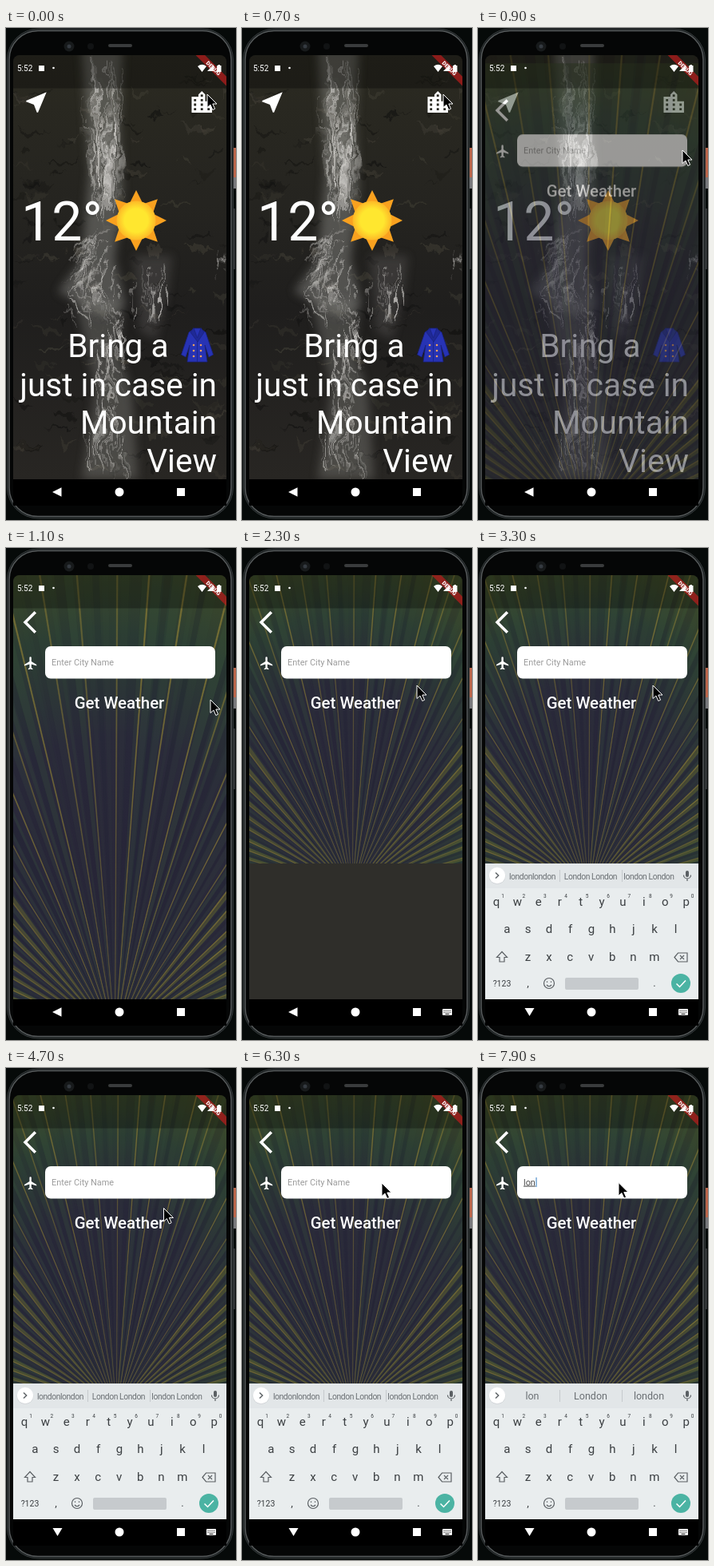
Write an HTML page that moves like this. It is 288 px wide and 616 px high and loops after 8 s.

```html
<!DOCTYPE html>
<html lang="en">
<head>
<meta charset="utf-8">
<title>Weather app</title>
<style>
  html, body { margin: 0; width: 100%; height: 100%; overflow: hidden; background: #060a09; }
  svg { display: block; width: 100%; height: 100%; font-family: Roboto, sans-serif; }
  .mid { text-anchor: middle; }
  .end { text-anchor: end; }
</style>
</head>
<body>
<svg viewBox="0 0 288 616" fill="#fff">
  <defs>
    <clipPath id="screen"><rect x="9" y="34" width="267" height="550" rx="8"/></clipPath>
    <filter id="soft" x="-20%" y="-20%" width="140%" height="140%"><feGaussianBlur stdDeviation="6"/></filter>
    <filter id="wisp" color-interpolation-filters="sRGB">
      <feTurbulence type="fractalNoise" baseFrequency=".07 .035" numOctaves="3" seed="4"/>
      <feDisplacementMap in="SourceGraphic" scale="24" xChannelSelector="R" yChannelSelector="G"/>
      <feGaussianBlur stdDeviation=".7"/>
    </filter>
    <linearGradient id="rock" x2="0" y2="1">
      <stop offset="0" stop-color="#2b2a21"/><stop offset=".35" stop-color="#252420"/>
      <stop offset=".6" stop-color="#1f1e1d"/><stop offset="1" stop-color="#282623"/>
    </linearGradient>
    <radialGradient id="disc">
      <stop offset=".6" stop-color="#ffe72f"/><stop offset="1" stop-color="#fdb827"/>
    </radialGradient>
    <radialGradient id="leaf" gradientUnits="userSpaceOnUse" cx="-16" cy="370" r="400">
      <stop offset="0" stop-color="#292739"/><stop offset=".42" stop-color="#2a2a3a"/>
      <stop offset=".75" stop-color="#2c3d33"/><stop offset="1" stop-color="#3f4a27"/>
    </radialGradient>
    <radialGradient id="gold" gradientUnits="userSpaceOnUse" cx="-6" cy="580" r="620">
      <stop offset="0" stop-color="#a89a3e"/><stop offset=".3" stop-color="#85783a"/>
      <stop offset=".65" stop-color="#6b6038"/><stop offset="1" stop-color="#877a35"/>
    </radialGradient>
  </defs>

  <!-- phone body -->
  <path fill="#b9654a" d="M284 150h4v37h-4z"/>
  <path fill="#77777a" d="M284 187h4v14h-4z"/>
  <path fill="#303334" d="M284 226h3v76h-3z"/>
  <rect x="1.500" y="1" width="283" height="613" rx="39" fill="#1a1e1f" stroke="#34393a"/>
  <rect x="4" y="3.500" width="278" height="608" rx="36" fill="#050606" stroke="#565a5b" stroke-width="1.500"/>
  <circle cx="79" cy="23" r="6.500" fill="#171a1b"/><circle cx="79" cy="23" r="2.500" fill="#343a40"/>
  <circle cx="106" cy="23" r="4" fill="#111314"/>
  <rect x="128" y="20" width="30" height="4" rx="2" fill="#393b3c"/>

  <g clip-path="url(#screen)">
    <g id="weather">
      <rect x="9" y="34" width="267" height="531" fill="url(#rock)"/>
      <g id="rocks" filter="url(#wisp)"/>
      <g filter="url(#soft)" fill="#9a9894">
        <path opacity=".42" d="M95 25H146L142 120 146 200 136 290 150 345 120 360 65 330 95 290 104 180Z"/>
        <path opacity=".2" d="M160 285H208L203 330 188 390 168 380Z"/>
        <path opacity=".32" d="M85 335 148 345 140 400 158 460 165 565H95L112 450Z"/>
      </g>
      <g id="water" filter="url(#wisp)" stroke="#e2e0dc"/>
      <path d="M21 3L3 10.530v.98l6.840 2.650L12.480 21h.98L21 3z" transform="translate(21 76) scale(1.417)"/>
      <path d="M15 11V5l-3-3-3 3v2H3v14h18V11h-6zm-8 8H5v-2h2v2zm0-4H5v-2h2v2zm0-4H5V9h2v2zm6 8h-2v-2h2v2zm0-4h-2v-2h2v2zm0-4h-2V9h2v2zm0-4h-2V5h2v2zm6 12h-2v-2h2v2zm0-4h-2v-2h2v2z" transform="translate(228.200 76.200) scale(1.417)"/>
      <text x="19" y="266" font-size="68">12°</text>
      <g transform="translate(163 241)">
        <g id="sun" fill="#f9a11f"/>
        <circle r="24.500" fill="url(#disc)"/>
      </g>
      <g class="end" font-size="40.600">
        <text x="203.500" y="412">Bring a</text><text x="264" y="460.500">just in case in</text>
        <text x="264" y="508">Mountain</text><text x="264" y="556">View</text>
      </g>
      <g stroke="#1a2380" stroke-width=".8">
        <path fill="#2733b4" d="M236 376 229 381 219.500 409 225 412 230 397 227 418H252L249 397 254 412 259.500 409 250 381 243 376Z"/>
        <path fill="#1f2996" d="M235 375.500 239.500 388 244 375.500 248 381 240 393 231 381Z"/>
        <path fill="none" d="M239.500 392V418"/>
      </g>
      <g id="buttons" fill="#f0a060"/>
    </g>

    <g id="search">
      <g id="palm">
        <rect x="-220" width="440" height="540" fill="url(#leaf)"/>
        <g id="rays"/>
      </g>
      <rect id="gap" x="9" y="395" width="267" height="171" fill="#2f2e2a"/>
      <path d="M11.670 3.870L9.900 2.100 0 12l9.900 9.900 1.770-1.770L3.540 12z" transform="translate(21.500 76) scale(1.417)"/>
      <path d="M21 16v-2l-8-5V3.500c0-.83-.67-1.500-1.500-1.500S10 2.670 10 3.500V9l-8 5v2l8-2.500V19l-2 1.500V22l3.500-1 3.500 1v-1.500L13 19v-5.500l8 2.500z" transform="translate(21.400 134.700) scale(.8)"/>
      <rect x="49" y="123" width="213" height="40.500" rx="7"/>
      <text id="hint" x="57" y="146.500" font-size="10.900" fill="#9c9c9c">Enter City Name</text>
      <text id="typed" x="57" y="146.500" font-size="10.900" fill="#4a4a4a" text-decoration="underline"></text>
      <rect id="caret" y="137" width="1.300" height="12" fill="#5f9ad0"/>
      <text class="mid" x="142" y="201" font-size="20.400" font-weight="500">Get Weather</text>
    </g>

    <path opacity=".3" fill="#000" d="M9 34h267v41.500H9z"/>
    <g transform="translate(276 34) rotate(45)">
      <rect x="-28" y="19" width="56" height="8.200" fill="#b71c1c" opacity=".72"/>
      <text class="mid" y="25.600" font-size="6.900" font-weight="900">DEBUG</text>
    </g>
    <text x="14" y="54" font-size="10">5:52</text>
    <rect x="41" y="47" width="7" height="7"/>
    <circle cx="59.500" cy="50" r="1.300"/>
    <path d="M240 48Q245.500 43.500 251 48L245.500 55ZM252 54 260 46V54ZM264 47h1.500v-1h2.500v1h1.500v8h-5.500z"/>

    <g id="keyboard" fill="#3b3f42">
      <rect x="9" y="395" width="267" height="171" fill="#e9edee"/>
      <rect x="9" y="395" width="267" height="31" fill="#e2e6e8"/>
      <circle cx="24" cy="410.500" r="10.500" fill="#cfd3d6"/><circle cx="24" cy="410" r="10.200" fill="#fff"/>
      <path id="chevron" d="M-2-3.500 1.700 0-2 3.500" fill="none" stroke="#5a5f63" stroke-width="1.400"/>
      <g id="words" class="mid" fill="#6a6f73">
        <path d="M102.500 403V418M180.500 403V418" stroke="#c6cacd"/>
        <text x="68" y="415"></text><text x="141" y="415"></text><text x="214" y="415"></text>
      </g>
      <rect x="260" y="404" width="4" height="8" rx="2" fill="#5a5f63"/>
      <path d="M257.500 409.500a4.500 4.500 0 0 0 9 0M262 414v3" fill="none" stroke="#5a5f63" stroke-width="1.200"/>
      <g id="keys" class="mid"/>
      <g fill="none" stroke="#5a5f63" stroke-width="1.200">
        <path d="M30 505.500 36.500 512.500H33V518H27V512.500H23.500Z"/>
        <path d="M246 512.500 250.500 507H262V518H250.500ZM253 510l5 5m0-5-5 5"/>
        <circle cx="89" cy="545" r="6.500"/><path d="M86 547q3 3.500 6 0M86.500 542.500v1.500M91.500 542.500v1.500"/>
      </g>
      <rect x="109" y="538" width="92" height="15" rx="2" fill="#c6cacd"/>
      <circle cx="254" cy="545" r="12" fill="#4bb3a3"/>
      <path d="M248.500 545.500 252.500 549.500 260 541.500" fill="none" stroke="#fff" stroke-width="1.500"/>
    </g>
  </g>

  <!-- navigation bar -->
  <rect x="9" y="565" width="267" height="33" fill="#000"/>
  <path id="back"/>
  <circle cx="142" cy="581" r="5.500"/>
  <path d="M214 576h10v10h-10z"/>
  <g id="imeIcon">
    <rect x="251" y="577" width="12" height="8" rx="1"/>
    <path d="M252.500 579.500h9M252.500 581.500h9" stroke="#000" stroke-width=".9" stroke-dasharray="1 1"/>
    <path d="M254.500 583.500h5" stroke="#000" stroke-width=".9"/>
  </g>
  <path id="mouse" fill="#000" stroke="#fff" d="M0 0V16.500L3.900 13 6.800 19.500 9.600 18.200 6.800 12H12Z"/>
</svg>

<script>
const $ = id => document.getElementById(id);
const fill = (id, parts) => { $(id).innerHTML = parts.join(''); };
const show = (id, on) => { $(id).style.display = on ? '' : 'none'; };
const range = (n, fn) => Array.from({ length: n }, (_, i) => fn(i));
const clamp = v => Math.max(0, Math.min(1, v));
let seed = 7;
const rnd = (a = 0, b = 1) => a + (b - a) * ((seed = seed * 16807 % 2147483647) / 2147483647);

// Waterfall: dark ledges, then streaks in bands [x, width, y, height, drift, count]
fill('rocks', range(150, () => {
  const x = rnd(0, 270), y = rnd(60, 560), w = rnd(10, 45);
  return `<path d="M${x} ${y}l${w} ${rnd(-7, 7)} ${-w / 2} ${rnd(3, 9)}z" fill="${rnd() < .6 ? '#0d0d0c' : '#47443a'}" opacity="${rnd(.2, .5)}"/>`;
}));
const bands = [[95, 50, 30, 190, 3, 50], [114, 32, 80, 170, -5, 40], [92, 45, 250, 85, -28, 45],
  [62, 85, 320, 55, 14, 40], [158, 52, 285, 90, -3, 25], [112, 36, 365, 110, 8, 40],
  [92, 68, 465, 100, 0, 45], [266, 8, 275, 45, 2, 6]];
fill('water', bands.flatMap(([x, w, y, h, drift, n]) => range(n, () => {
  const len = h * rnd(.12, .45);
  return `<path d="M${x + w * (rnd() + rnd()) / 2} ${y + rnd(0, h - len)}l${drift * rnd(0, 1.2)} ${len}" stroke-width="${rnd(.7, 2.4)}" opacity="${rnd(.1, .45)}"/>`;
})));

// Sun points and coat buttons
fill('sun', range(8, i => `<path d="M-8.500-21 0-38 8.500-21z" transform="rotate(${i * 45})"/>`));
fill('buttons', range(6, i => `<circle cx="${i % 2 ? 244 : 235}" cy="${397 + 7 * (i >> 1)}" r="1.300"/>`));

// Palm leaf: folds fanning out from one point
const fan = (angle, tip, style) => `<path d="M0 0L${-tip}-800H${tip}z" transform="translate(-6 580) rotate(${angle})" ${style}/>`;
fill('rays', range(39, i => {
  const a = -87.4 + i * 4.6 + rnd(-.5, .5), outer = Math.abs(a) > 35;
  const folds = range(3, k => fan(a + 1.15 * (k + 1), rnd(4, 11), `fill="${k % 2 ? '#1a1c2b' : '#3a5a3c'}" opacity="${rnd(.06, .24)}"`));
  const glow = outer ? fan(a + .7, 10, 'fill="#858327" opacity=".3"') : '';
  return folds.join('') + glow + fan(a, outer ? 2.2 : 1.2, `fill="url(#gold)" stroke="url(#gold)" stroke-width=".5" opacity="${rnd(.55, .85)}"`);
}));

// Keyboard letters
const label = (x, y, size, s) => `<text x="${x}" y="${y}" font-size="${size}">${s}</text>`;
const row = (s, x, y) => [...s].map((c, i) => label(x + 26.4 * i, y, 15, c));
fill('keys', [
  ...row('qwertyuiop', 23, 448), ...row('asdfghjkl', 36.3, 482), ...row('zxcvbnm', 62.5, 516.5),
  ...range(10, i => label(31 + 26.4 * i, 437.5, 6.5, (i + 1) % 10)),
  label(30, 549, 10.5, '?123'), label(62.5, 549, 13, ','), label(221, 549, 13, '.')
]);

// y of a unit cubic Bezier at a given x
function bezier(x1, y1, x2, y2, x) {
  const at = (a, b, u) => 3 * a * u * (1 - u) ** 2 + 3 * b * u * u * (1 - u) + u ** 3;
  let lo = 0, hi = 1;
  for (let i = 0; i < 24; i++) {
    const m = (lo + hi) / 2;
    at(x1, x2, m) < x ? lo = m : hi = m;
  }
  return at(y1, y2, lo);
}

// Pointer stops: [time, x, y]
const pointer = [[0, 252, 83], [700, 252, 83], [900, 256, 153], [1100, 256, 190], [1500, 219, 172],
  [4200, 219, 172], [4500, 221, 202], [4900, 174, 149], [6200, 174, 149], [6300, 175, 144], [6400, 176, 143.5], [8000, 176, 143.5]];
function pointerAt(t) {
  const i = pointer.findIndex(p => p[0] > t), [t0, x0, y0] = pointer[i - 1], [t1, x1, y1] = pointer[i];
  const k = (t - t0) / (t1 - t0);
  return [x0 + (x1 - x0) * k, y0 + (y1 - y0) * k];
}

function draw(t) {
  // page change: fade in while sliding up
  const p = clamp((t - 695) / 300);
  $('search').style.opacity = bezier(.42, 0, 1, 1, p);
  $('search').setAttribute('transform', `translate(0 ${145 * (1 - bezier(.4, 0, .2, 1, p))})`);
  show('search', p > 0);
  show('weather', p < 1);

  // the page shrinks at once, then the keyboard slides in
  const small = t >= 2200;
  $('palm').setAttribute('transform', `translate(142.5 34) scale(${small ? .68 : 1})`);
  show('gap', small);
  show('imeIcon', small);
  $('keyboard').setAttribute('transform', `translate(0 ${171 * (1 - clamp((t - 2300) / 400)) ** 2})`);
  $('back').setAttribute('d', t >= 2400 ? 'M58.500 576h12l-6 10z' : 'M58 581l11.500-5.800v11.600z');

  // typing
  const text = 'lon'.slice(0, t < 7500 ? 0 : t < 7700 ? 1 : t < 7900 ? 2 : 3);
  const cleared = t >= 6700 && !text;
  $('typed').textContent = text;
  show('hint', !text);
  $('caret').setAttribute('x', 57 + (text ? $('typed').getComputedTextLength() + .5 : 0));
  show('caret', text || (t >= 6700 && t < 7200));

  // suggestions
  const words = text ? [text, 'London', 'london'] : ['londonlondon', 'London London', 'london London'];
  $('words').querySelectorAll('text').forEach((el, i) => {
    el.textContent = words[i];
    el.style.fontSize = text ? '12.5px' : '10.3px';
    el.style.letterSpacing = text ? '0' : '-.4px';
    el.style.opacity = t < 2900 ? 0 : t < 3000 ? .5 : 1;
  });
  show('words', !cleared);
  $('chevron').setAttribute('transform', `translate(24 410) scale(${cleared ? -1 : 1} 1)`);

  $('mouse').setAttribute('transform', `translate(${pointerAt(t)})`);
}

const start = performance.now();
function tick() {
  const t = (performance.now() - start) % 8000;
  draw(Math.floor(t / 100) * 100);
  requestAnimationFrame(tick);
}
tick();
</script>
</body>
</html>
```
